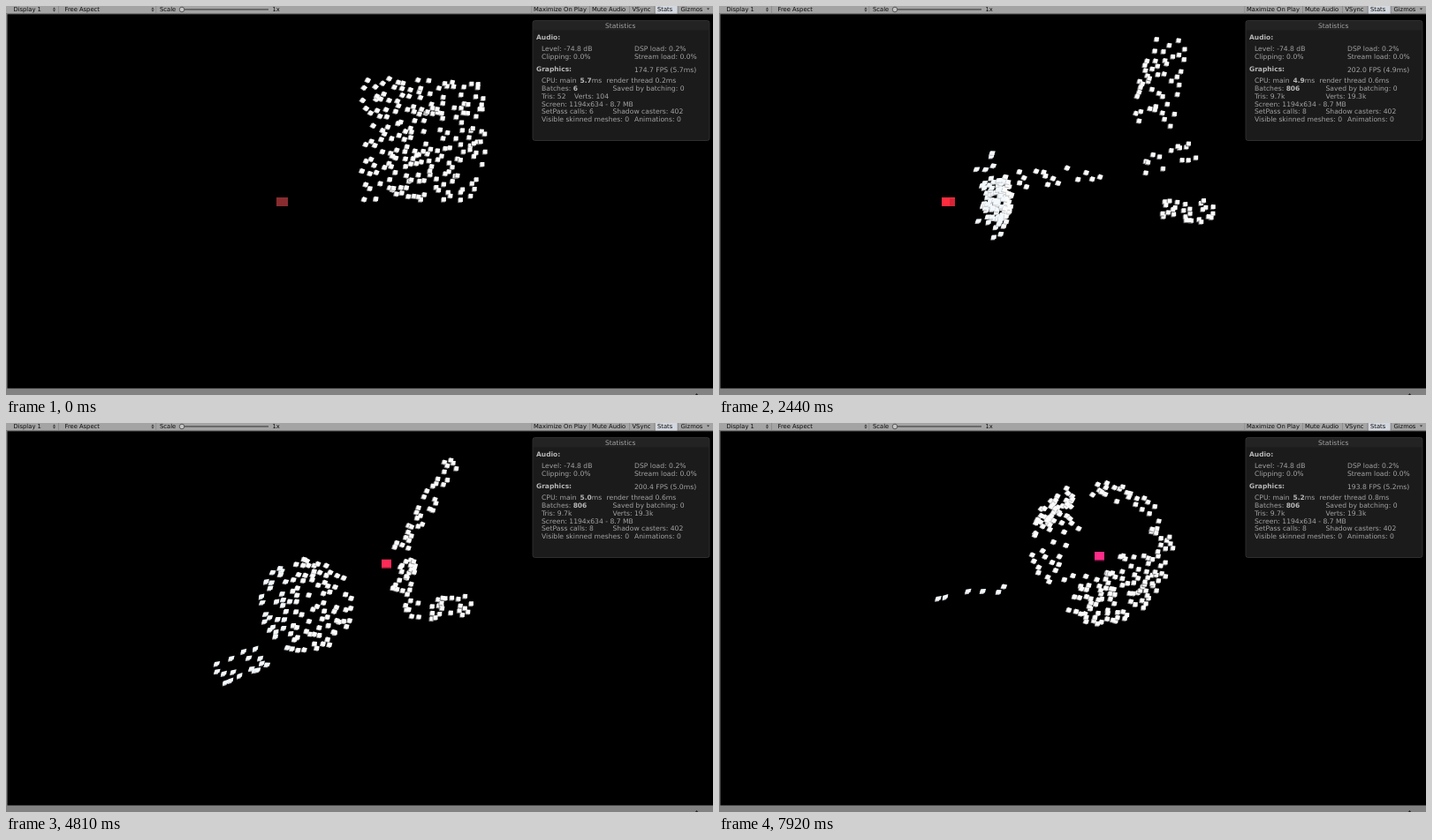
Write an HTML page with a canvas that moves like this. It is 800 px wide and 441 px high and loops after 8000 ms.

```html
<!DOCTYPE html>
<html lang="en">
<head>
<meta charset="utf-8">
<title>Swarm</title>
<style>
html, body { margin: 0; width: 100%; height: 100%; overflow: hidden; background: #000; }
canvas { display: block; width: 800px; height: 441px; }
</style>
</head>
<body>
<canvas id="stage" width="800" height="441"></canvas>
<script>
const ctx = document.getElementById('stage').getContext('2d');
const LOOP = 8000, START = 310, END = 7920, STEP = 79.35, COUNT = 200;
const FONT = '"DejaVu Sans", sans-serif';

let seed = 20417;
function rand() {
  seed = (seed + 0x6D2B79F5) | 0;
  let r = Math.imul(seed ^ (seed >>> 15), 1 | seed);
  r = (r + Math.imul(r ^ (r >>> 7), 61 | r)) ^ r;
  return ((r ^ (r >>> 14)) >>> 0) / 4294967296;
}
const clamp = v => Math.min(1, Math.max(0, v));
const mix = (a, b, u) => a + (b - a) * u;
const ramp = (t, a, b) => clamp((t - a) / (b - a));

// Random points in a band of half width w along a line
const strip = (n, x0, y0, x1, y1, w) => ({ n, pick() {
  const u = rand(), v = (rand() * 2 - 1) * w, len = Math.hypot(x1 - x0, y1 - y0);
  return { x: mix(x0, x1, u) - v * (y1 - y0) / len, y: mix(y0, y1, u) + v * (x1 - x0) / len };
} });

// Random points in a ring sector, angles in degrees
const sector = (n, x, y, r0, r1, a0 = 0, a1 = 360) => ({ n, pick() {
  const r = Math.sqrt(mix(r0 * r0, r1 * r1, rand())), a = mix(a0, a1, rand()) * Math.PI / 180;
  return { x: x + r * Math.cos(a), y: y + r * Math.sin(a) };
} });

// The last shape of a pose takes all cubes that remain
function pose(t, fps, thread, ...shapes) {
  const pts = [];
  const gap = p => Math.min(...pts.map(q => Math.hypot(p.x - q.x, p.y - q.y)));
  shapes.forEach((shape, k) => {
    const n = k === shapes.length - 1 ? COUNT - pts.length : shape.n;
    for (let i = 0; i < n; i++) {
      const a = shape.pick(), b = shape.pick();
      pts.push(gap(a) > gap(b) ? a : b);
    }
  });
  return { t, fps, thread, pts };
}

const REST = 0;
const poses = [
  pose(START, 205.3, 0.6, strip(REST, 472, 82, 472, 221, 70)),
  pose(940, 217.7, 0.7,
    strip(40, 458, 84, 546, 100, 16),
    strip(30, 492, 136, 530, 184, 19),
    strip(22, 523, 190, 528, 230, 20),
    sector(REST, 405, 100, 8, 128, 57, 104)),
  pose(2440, 202.1, 0.6,
    strip(46, 508, 37, 492, 135, 24),
    strip(14, 472, 186, 541, 162, 11),
    strip(28, 500, 228, 560, 235, 13),
    strip(15, 340, 196, 432, 190, 10),
    sector(25, 250, 218, 50, 84, -42, 36),
    sector(REST, 250, 218, 50, 82, -19, 21)),
  pose(3370, 196.8, 0.7,
    strip(47, 514, 22, 474, 118, 16),
    strip(7, 520, 150, 518, 168, 10),
    strip(35, 507, 192, 568, 250, 14),
    strip(4, 322, 212, 344, 206, 6),
    sector(REST, 246, 220, 32, 64, -88, 88)),
  pose(4810, 200.5, 0.6,
    strip(33, 506, 42, 446, 146, 9),
    strip(22, 456, 154, 446, 194, 10),
    strip(29, 447, 214, 527, 208, 12),
    strip(17, 238, 284, 292, 266, 14),
    sector(REST, 338, 206, 10, 54)),
  pose(6730, 193, 0.6,
    strip(11, 243, 240, 312, 213, 8),
    strip(15, 398, 84, 378, 136, 14),
    strip(28, 418, 106, 414, 140, 20),
    sector(16, 438, 165, 52, 70, -45, 35),
    sector(REST, 440, 170, 0, 50)),
  pose(END, 193.8, 0.8,
    strip(6, 243, 203, 323, 188, 5),
    sector(32, 431, 149, 62, 84, 205, 245),
    sector(34, 431, 149, 62, 83, -100, 0),
    sector(28, 431, 149, 36, 82, 140, 245),
    sector(REST, 431, 149, 22, 79, 0, 125))
];

// Pair points of two poses by swapping until the total travel is short
function pair(from, to) {
  const cost = (a, b) => (a.x - b.x) ** 2 + (a.y - b.y) ** 2;
  for (let pass = 0; pass < 10; pass++) {
    for (let i = 0; i < COUNT; i++) {
      for (let j = i + 1; j < COUNT; j++) {
        if (cost(from[i], to[j]) + cost(from[j], to[i]) < cost(from[i], to[i]) + cost(from[j], to[j])) {
          [to[i], to[j]] = [to[j], to[i]];
        }
      }
    }
  }
}
for (let k = 1; k < poses.length; k++) pair(poses[k - 1].pts, poses[k].pts);
const tilt = Array.from({ length: COUNT }, () => (rand() - 0.5) * 0.3);

function slope(k, i, axis) {
  if (k === 0) return 0;
  const a = poses[k - 1], b = poses[Math.min(k + 1, poses.length - 1)];
  return (b.pts[i][axis] - a.pts[i][axis]) / (b.t - a.t);
}

function along(k, i, axis, u) {
  const a = poses[k], b = poses[k + 1], d = b.t - a.t, u2 = u * u, u3 = u2 * u;
  return (2 * u3 - 3 * u2 + 1) * a.pts[i][axis] + (u3 - 2 * u2 + u) * d * slope(k, i, axis)
    + (3 * u2 - 2 * u3) * b.pts[i][axis] + (u3 - u2) * d * slope(k + 1, i, axis);
}

function locate(t) {
  const k = Math.max(0, poses.slice(0, -1).findLastIndex(p => p.t <= t));
  return { k, u: ramp(t, poses[k].t, poses[k + 1].t) };
}

function stepTime(t) {
  if (t < START) return 0;
  return Math.min(END, START + Math.floor((t - START) / STEP + 0.45) * STEP);
}

function box(x, y, w, h, fill) {
  ctx.fillStyle = fill;
  ctx.fillRect(x, y, w, h);
}

function text(s, x, y, size = 7.65, fill = '#a2a2a2', weight = 'normal') {
  ctx.font = `${weight} ${size}px ${FONT}`;
  ctx.fillStyle = fill;
  ctx.fillText(s, x, y);
  return x + ctx.measureText(s).width;
}
const bold = (s, x, y) => text(s, x, y, 7.5, '#b8b8b8', 'bold');

// Cubes face the leader: turned in the middle, sheared far left, side faces showing on the right
function cube(x, y, i) {
  const right = clamp((x - 400) / 130), left = clamp((340 - x) / 60);
  const turn = 0.6 * clamp((535 - x) / 130) * (0.35 + 0.65 * clamp((225 - y) / 130));
  const g = Math.round(mix(200, 105, right));
  ctx.save();
  ctx.translate(x, y);
  ctx.rotate(turn * (1 - left) + tilt[i] * (1 - right * 0.6));
  ctx.transform(1, -0.25 * left, -0.2 * left, 1, 0, 0);
  box(-3, -1.9, 4.8, 4.9, `rgb(${g},${g},${g + 4})`);
  box(-2 - left, -2.8, mix(4.8, 6, left), mix(4.8, 4.4, left), left > 0.3 ? '#f3f9fc' : '#fcfcfc');
  ctx.restore();
}

function drawSwarm(t) {
  const { k, u } = locate(t);
  for (let i = 0; i < COUNT; i++) cube(along(k, i, 'x', u), along(k, i, 'y', u), i);
}

function drawLeader(t) {
  const out = ramp(t, 1850, 2440), back = ramp(t, 2800, 3370);
  const over = ramp(t, 3370, 4700), glow = ramp(t, 1000, 2440);
  const x = 312.5 - 53 * out + 27 * back + 144 * over;
  const y = 222 - 62 * over - 9 * ramp(t, 4810, 5500);
  const w = 13 + 2 * out - 4 * back, h = 10;
  const rgb = [mix(136, 253, glow), 44, 48 + 15 * glow + 72 * ramp(t, START * 11, END)];
  const shade = f => `rgb(${rgb.map(v => Math.round(v * f))})`;
  box(x - w / 2, y - h / 2, w, h, shade(1));
  box(x - w / 2, y + h / 2 - over, w, 1.5 * over, shade(0.5));
  const side = w * 0.4 * out * (1 - back);
  box(x + w / 2 - side, y - h / 2 + 1, side, h - 1, shade(0.85));
}

function triangle(x, y, s, fill) {
  ctx.fillStyle = fill;
  ctx.beginPath();
  ctx.moveTo(x - 1.6, y);
  ctx.lineTo(x + 1.6, y);
  ctx.lineTo(x, y + s);
  ctx.fill();
}

function drawChrome() {
  box(0, 0, 800, 9, '#a4a4a4');
  box(0, 8.5, 800, 1, '#555');
  box(0, 9, 1.5, 432, '#858585');
  box(0, 433.5, 800, 7.5, '#828282');
  triangle(781.5, 441, -2, '#222');
  box(735, 0, 24.5, 8.5, '#d3d7df');
  for (const x of [59, 169.5, 594.5, 660, 705, 733.5, 760]) box(x, 0, 0.7, 8.5, '#858585');
  const label = (s, x) => text(s, x, 6.2, 6.75, '#0c0c0c');
  label('Display 1', 8.5);
  label('Free Aspect', 66.5);
  label('Scale', 174);
  label('1x', 301.5);
  label('Maximize On Play', 597);
  label('Mute Audio', 663);
  label('VSync', 708.5);
  label('Stats', 737);
  label('Gizmos', 763.5);
  for (const x of [54.5, 166]) {
    triangle(x, 3.4, -2, '#333');
    triangle(x, 4.6, 2, '#333');
  }
  triangle(794.5, 2.5, 2, '#333');
  box(197, 3.3, 100, 1.3, '#4c4c4c');
  ctx.beginPath();
  ctx.arc(199, 4, 2.8, 0, 7);
  ctx.fillStyle = '#c4c4c4';
  ctx.fill();
  ctx.lineWidth = 0.8;
  ctx.strokeStyle = '#444';
  ctx.stroke();
}

function drawStats(t) {
  const live = t >= START, { k, u } = locate(t);
  const reading = (name, idle) => live ? mix(poses[k][name], poses[k + 1][name], u) : idle;
  const fps = reading('fps', 174.7), thread = reading('thread', 0.2);
  const ms = (1000 / fps).toFixed(1);
  const left = 606, mid = 686.5, right = 711;
  const row = n => 87.4 + n * 8.7;

  ctx.beginPath();
  ctx.roundRect(596, 16.5, 200, 136, 2.5);
  ctx.fillStyle = '#1b1b1b';
  ctx.fill();
  box(596.5, 17, 199, 10.5, '#232323');
  ctx.lineWidth = 0.8;
  ctx.strokeStyle = '#363636';
  ctx.stroke();

  text('Statistics', 678, 25, 7.5);
  bold('Audio:', 600, 37.8);
  text('Level: -74.8 dB', left, 51.2);
  text('DSP load: 0.2%', right, 51.2);
  text('Clipping: 0.0%', left, 59.9);
  text('Stream load: 0.0%', right, 59.9);
  bold('Graphics:', 600, 74);
  text(`${fps.toFixed(1)} FPS (${ms}ms)`, right, 74.6);
  text('CPU: main', left, row(0));
  text('ms', bold(ms, 649.5, row(0)), row(0));
  text(`render thread ${thread.toFixed(1)}ms`, 679.5, row(0));
  bold(live ? '806' : '6', text('Batches: ', left, row(1)), row(1));
  text('Saved by batching: 0', mid, row(1));
  text(live ? 'Tris: 9.7k' : 'Tris: 52', left, row(2));
  text(live ? 'Verts: 19.3k' : 'Verts: 104', live ? mid : 643, row(2));
  text('Screen: 1194x634 - 8.7 MB', left, row(3));
  text(`SetPass calls: ${live ? 8 : 6}`, left, row(4));
  text('Shadow casters: 402', mid, row(4));
  text('Visible skinned meshes: 0', left, row(5));
  text('Animations: 0', right, row(5));
}

function frame(now) {
  const t = stepTime(now % LOOP);
  box(0, 0, 800, 441, '#000');
  drawSwarm(t);
  drawLeader(t);
  drawChrome();
  drawStats(t);
  requestAnimationFrame(frame);
}
frame(0);
</script>
</body>
</html>
```
